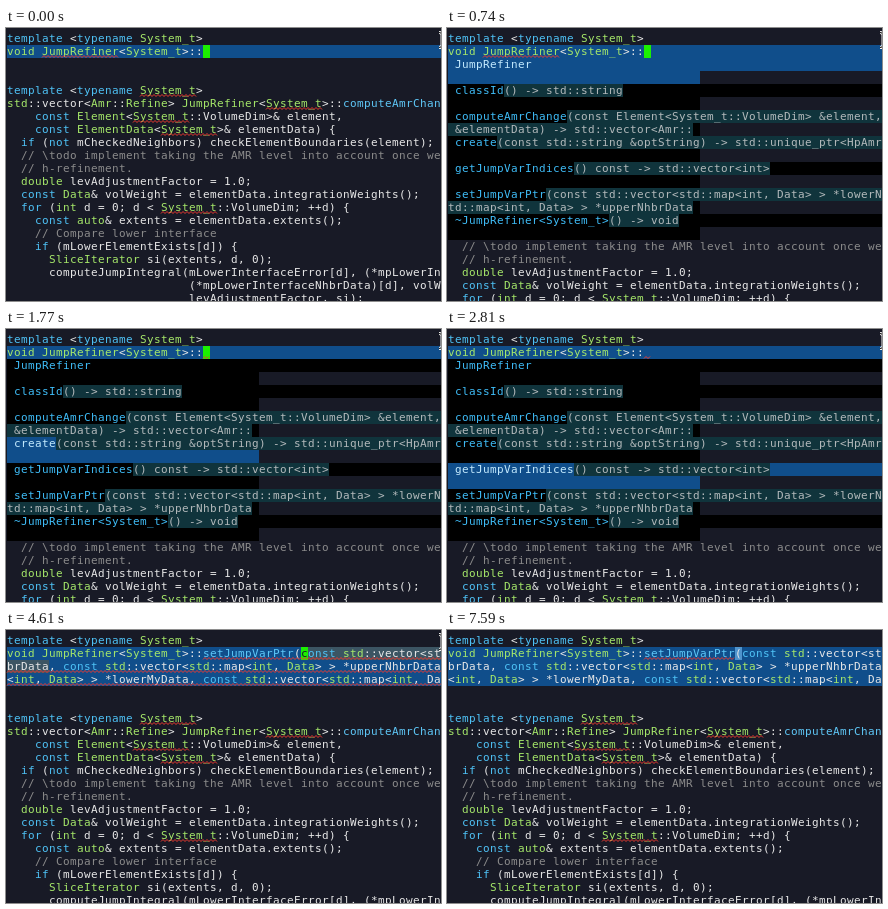
These frames come from a looping animation (435 by 273 pixels, 7880 ms). An HTML page with a canvas:

```html
<!DOCTYPE html>
<html lang="en">
<head>
<meta charset="utf-8">
<title>Code completion</title>
<style>
html, body { margin: 0; width: 100%; height: 100%; overflow: hidden; background: #181a26; }
canvas { display: block; }
</style>
</head>
<body>
<canvas id="stage" width="435" height="273"></canvas>
<script>
const ctx = document.getElementById('stage').getContext('2d');
const LOOP = 7880, CW = 7, RH = 13, COLS = 62;
const C = {
  bg: '#181a26', line: '#104e8b', popup: '#000', note: '#10343c', noteText: '#b4babc',
  name: '#3fbdf8', picked: '#c4ebff', cursor: '#1cf000', error: '#f03a30',
  field: '#3c5563', paren: '#4f94cd', text: '#e8e8e8', keyword: '#4fc3f7',
  type: '#a6e86a', func: '#5fc8f8', comment: '#8c8c8c'
};

const HEAD = 'template <typename System_t>';
const STEM = 'void JumpRefiner<System_t>::';
const FILLED = [
  STEM + 'setJumpVarPtr(const std::vector<st',
  'brData, const std::vector<std::map<int, Data> > *upperNhbrData',
  '<int, Data> > *lowerMyData, const std::vector<std::map<int, Da'
];
const CODE = [
  HEAD,
  'std::vector<Amr::Refine> JumpRefiner<System_t>::computeAmrChan',
  '    const Element<System_t::VolumeDim>& element,',
  '    const ElementData<System_t>& elementData) {',
  '  if (not mCheckedNeighbors) checkElementBoundaries(element);',
  '  // \\todo implement taking the AMR level into account once we',
  '  // h-refinement.',
  '  double levAdjustmentFactor = 1.0;',
  '  const Data& volWeight = elementData.integrationWeights();',
  '  for (int d = 0; d < System_t::VolumeDim; ++d) {',
  '    const auto& extents = elementData.extents();',
  '    // Compare lower interface',
  '    if (mLowerElementExists[d]) {',
  '      SliceIterator si(extents, d, 0);',
  '      computeJumpIntegral(mLowerInterfaceError[d], (*mpLowerIn',
  ' '.repeat(26) + '(*mpLowerInterfaceNhbrData)[d], volW',
  ' '.repeat(26) + 'levAdjustmentFactor, si);'
];
// name, signature, wrapped rest of the signature
const ITEMS = [
  ['JumpRefiner', '', ''],
  ['classId', '() -> std::string', ''],
  ['computeAmrChange', '(const Element<System_t::VolumeDim> &element,', ' &elementData) -> std::vector<Amr::'],
  ['create', '(const std::string &optString) -> std::unique_ptr<HpAmr', ''],
  ['getJumpVarIndices', '() const -> std::vector<int>', ''],
  ['setJumpVarPtr', '(const std::vector<std::map<int, Data> > *lowerN', 'td::map<int, Data> > *upperNhbrData'],
  ['~JumpRefiner<System_t>', '() -> void', '']
];
const PICK_TIMES = [740, 1330, 1620, 1770, 2220, 3410];
const CURSOR_OFF = [[590, 740], [1180, 1330], [2810, 3410], [4010, 4460], [5210, 5660]];

const TOKENS = [
  [/^\/\/.*/, C.comment],
  [/^(template|typename|const|if|not|for)\b/, C.keyword],
  [/^(void|double|int|auto|std|Amr|Refine|JumpRefiner|System_t|Element|ElementData|Data|SliceIterator)\b/, C.type],
  [/^(computeAmrChan|setJumpVarPtr)\b/, C.func],
  [/^(\w+|\s+|[^\w\s])/, C.text]
];

const px = col => 1 + col * CW;
const py = row => 4 + row * RH;

function fill(col, row, n, color) {
  ctx.fillStyle = color;
  ctx.fillRect(px(col), py(row), n * CW, RH);
}

function put(str, col, row, color) {
  ctx.fillStyle = color;
  [...str].forEach((ch, i) => {
    if (ch !== ' ') ctx.fillText(ch, px(col + i), py(row) + 10);
  });
}

function code(str, row) {
  let col = 0;
  while (col < str.length) {
    const rest = str.slice(col);
    const [re, color] = TOKENS.find(t => t[0].test(rest));
    const word = rest.match(re)[0];
    put(word, col, row, color);
    col += word.length;
  }
}

function wave(col, row, n) {
  const x0 = px(col), y = py(row) + 10.5;
  ctx.strokeStyle = C.error;
  ctx.lineWidth = 1;
  ctx.beginPath();
  for (let x = 0; x <= n * CW; x += 2) ctx.lineTo(x0 + x, y + (x % 4 ? 0 : 2));
  ctx.stroke();
}

function body(top, first) {
  for (let i = first; i < CODE.length && py(top + i) < 273; i++) {
    code(CODE[i], top + i);
    const at = CODE[i].indexOf('System_t');
    if (at >= 0) wave(at, top + i, 8);
  }
}

function popup(pick) {
  ITEMS.forEach(([name, sig, more], i) => {
    const row = 2 + i * 2, on = i === pick, back = on ? C.line : C.popup;
    fill(0, row, COLS, back);
    fill(0, row + 1, 36, back);
    fill(1 + name.length, row, sig.length, C.note);
    fill(0, row + 1, more.length, C.note);
    put(name, 1, row, on ? C.picked : C.name);
    put(sig, 1 + name.length, row, C.noteText);
    put(more, 0, row + 1, C.noteText);
  });
}

function typing(t, cursorOn) {
  fill(0, 1, COLS, C.line);
  code(STEM, 1);
  if (t < 740) {
    body(4, 0);
  } else {
    popup(PICK_TIMES.filter(p => p <= t).length - 1);
    body(11, 5);
  }
  if (cursorOn) fill(28, 1, 1, C.cursor);
  if (t < 1470) wave(5, 1, 11);
  else wave(28, 1, 1);
}

function inserted(t, cursorOn) {
  for (let r = 1; r < 4; r++) fill(0, r, COLS, C.line);
  if (t < 5660) {
    fill(42, 1, 20, C.field);
    fill(0, 2, 6, C.field);
  }
  if (t >= 5800) fill(41, 1, 1, C.paren);
  FILLED.forEach((s, i) => code(s, i + 1));
  if (t < 5660 && cursorOn) {
    fill(42, 1, 1, C.cursor);
    put('c', 42, 1, C.bg);
  }
  if (t < 6100) {
    wave(28, 1, 34);
    wave(0, 2, COLS);
    wave(0, 3, COLS);
  } else {
    wave(28, 1, 13);
  }
  body(6, 0);
}

function beam(x, y) {
  const bar = (w, color) => {
    ctx.strokeStyle = color;
    ctx.lineWidth = w;
    ctx.beginPath();
    ctx.moveTo(x + 1, y + 1.5);
    ctx.quadraticCurveTo(x + 4, y + 1.5, x + 4, y + 4);
    ctx.lineTo(x + 4, y + 14);
    ctx.quadraticCurveTo(x + 4, y + 16.5, x + 1, y + 16.5);
    ctx.moveTo(x + 7, y + 1.5);
    ctx.quadraticCurveTo(x + 4, y + 1.5, x + 4, y + 4);
    ctx.moveTo(x + 4, y + 14);
    ctx.quadraticCurveTo(x + 4, y + 16.5, x + 7, y + 16.5);
    ctx.stroke();
  };
  bar(3, '#f4f4f4');
  bar(1, '#000');
}

function mouse(t) {
  if (t < 6400) beam(432, 3);
  else if (t < 6550) beam(432, 21);
  else if (t >= 7300 && t < 7440) beam(369, 272);
  else if (t >= 7440 && t < 7590) beam(355.5, 269);
}

function draw(t) {
  ctx.fillStyle = C.bg;
  ctx.fillRect(0, 0, 435, 273);
  ctx.font = '11px "DejaVu Sans Mono", monospace';
  ctx.textBaseline = 'alphabetic';
  code(HEAD, 0);
  const cursorOn = !CURSOR_OFF.some(([a, b]) => t >= a && t < b);
  (t < 4610 ? typing : inserted)(t, cursorOn);
  mouse(t);
}

const start = performance.now();
function tick() {
  draw((performance.now() - start) % LOOP);
  requestAnimationFrame(tick);
}
tick();
</script>
</body>
</html>
```
